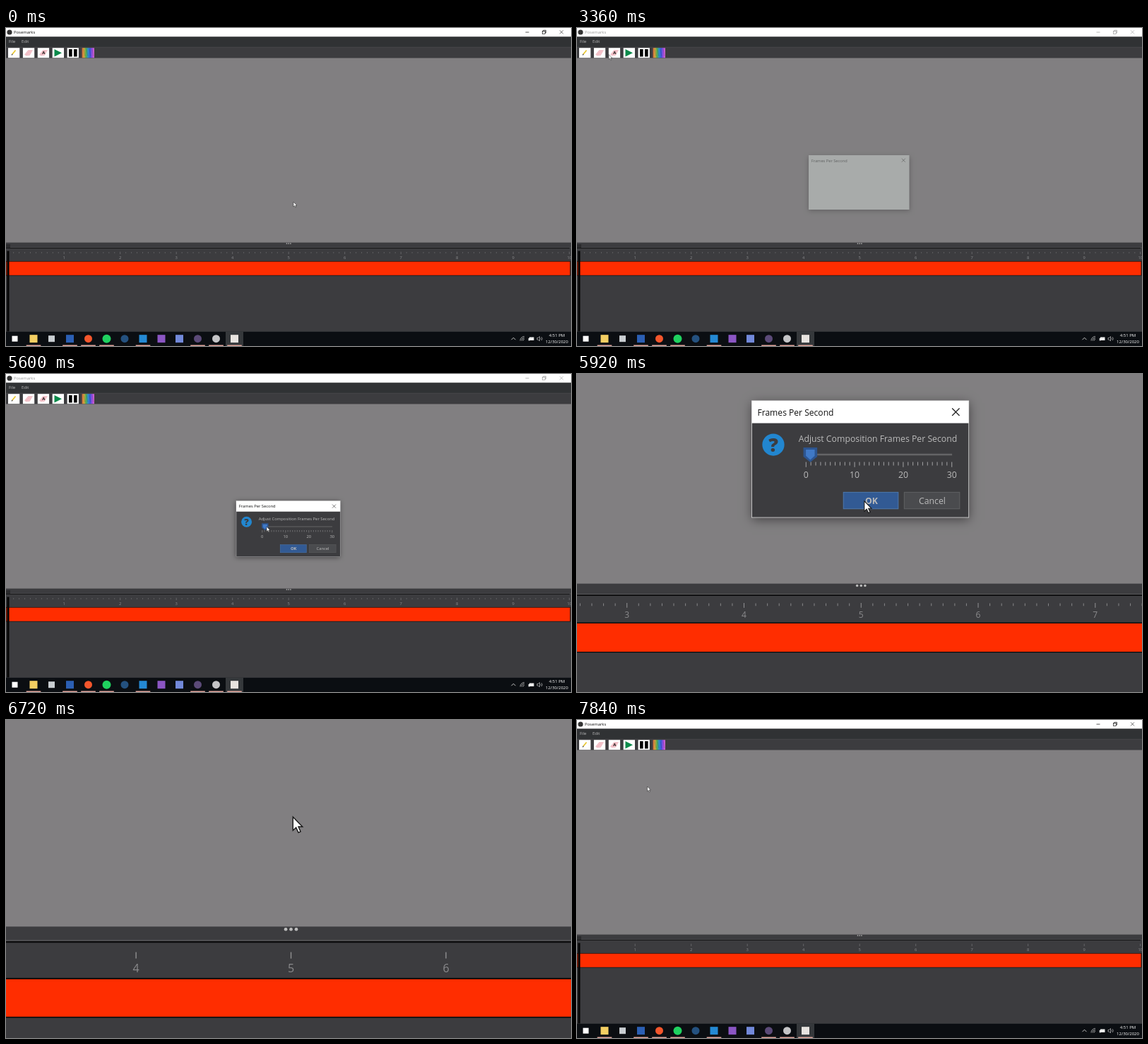
Animation of 800x450 px, one loop 8 s. Source, as an HTML page with a canvas:

```html
<!DOCTYPE html>
<html lang="en">
<head>
<meta charset="utf-8">
<title>Timeline editor</title>
<style>
html, body { margin: 0; width: 100%; height: 100%; overflow: hidden; background: #3c3c3f; }
canvas { display: block; }
</style>
</head>
<body>
<canvas width="800" height="450"></canvas>
<script>
const c = document.querySelector('canvas').getContext('2d');
const LOOP = 8000;
const FOCUS = [398.3, 310];
const SLATE = '#3c3c3f', INK = '#bbbbbb';

// Cursor stops: time, x, y
const STOPS = [
  [0, 407, 246], [400, 407, 246], [1500, 32, 20], [2250, 32, 20], [2700, 45, 37.5],
  [3400, 45, 37.5], [4100, 398, 216], [4500, 398, 216], [5450, 369, 216], [5620, 369, 216],
  [5900, 402.4, 247.6], [6400, 401.2, 247.4], [7300, 401.2, 247.4], [7680, 296, 184], [7840, 99.5, 94]
];

const ramp = (a, b, t) => {
  const u = Math.min(1, Math.max(0, (t - a) / (b - a)));
  return u * u * (3 - 2 * u);
};

function cursorAt(t) {
  const i = STOPS.findIndex(p => p[0] > t);
  if (i < 0) return STOPS.at(-1).slice(1);
  const [a, ax, ay] = STOPS[i - 1], [b, bx, by] = STOPS[i];
  const u = ramp(a, b, t);
  return [ax + (bx - ax) * u, ay + (by - ay) * u];
}

function box(x, y, w, h, fill, stroke, lw = 0.5) {
  c.fillStyle = fill;
  c.fillRect(x, y, w, h);
  if (stroke) {
    c.strokeStyle = stroke;
    c.lineWidth = lw;
    c.strokeRect(x, y, w, h);
  }
}

function poly(points, fill, stroke, lw = 0.6) {
  c.beginPath();
  points.forEach(([x, y]) => c.lineTo(x, y));
  c.closePath();
  if (fill) { c.fillStyle = fill; c.fill(); }
  if (stroke) { c.strokeStyle = stroke; c.lineWidth = lw; c.stroke(); }
}

function line(color, lw, ...p) {
  c.strokeStyle = color;
  c.lineWidth = lw;
  c.beginPath();
  for (let i = 0; i < p.length; i += 2) c.lineTo(p[i], p[i + 1]);
  c.stroke();
}

function disc(x, y, r, fill) {
  c.fillStyle = fill;
  c.beginPath();
  c.arc(x, y, r, 0, 7);
  c.fill();
}

function text(s, x, y, color = INK, align = 'left', size = 5.88, weight = 400) {
  c.font = `${weight} ${size}px "Open Sans", "Noto Sans", sans-serif`;
  c.fillStyle = color;
  c.textAlign = align;
  c.fillText(s, x, y);
}

function cross(x, y, r, color) {
  line(color, 0.6, x - r, y - r, x + r, y + r);
  line(color, 0.6, x - r, y + r, x + r, y - r);
}

// Canvas shadows ignore the transform, so they are scaled by hand.
function shadowed(draw, alpha = 0.5) {
  const zoom = c.getTransform().a;
  c.save();
  c.shadowColor = `rgba(0,0,0,${alpha})`;
  c.shadowBlur = 7 * zoom;
  c.shadowOffsetY = 1.5 * zoom;
  draw();
  c.restore();
}

function titleBar(active) {
  const ink = active ? '#111' : '#999';
  box(0, 0, 800, 12.4, '#fff');
  disc(5, 6, 3.6, '#333');
  text('Posemarks', 11, 8.2, ink);
  line(ink, 0.7, 735.5, 6, 740.5, 6);
  c.strokeStyle = ink;
  c.lineWidth = 0.7;
  c.strokeRect(759.5, 4.5, 3.7, 3.7);
  line(ink, 0.7, 760.8, 4.5, 760.8, 3.2, 764.5, 3.2, 764.5, 7, 763.2, 7);
  cross(786.5, 5.8, 2.5, ink);
}

function eraser(x) {
  poly([[x, 37.5], [x + 5, 31.5], [x + 11, 31.5], [x + 7, 38.5], [x + 2, 39]], '#f4c3ca', '#e3a3ad', 0.4);
  line('#e6a9b3', 0.5, x + 2, 38, x + 8, 32);
}

function toolbar() {
  box(0, 27, 800, 15.5, SLATE);
  line('#505052', 0.5, 0, 27.2, 800, 27.2);
  for (let i = 0; i < 5; i++) box(3 + i * 20.9, 28.2, 16.3, 14, '#fff');
  line('#e9c834', 1.8, 9, 37, 13.5, 31.5);
  line('#333', 1.1, 8, 38.3, 9.2, 36.9);
  eraser(26.5);
  eraser(47.5);
  text('A', 53.3, 37.3, '#111', 'center', 6, 700);
  poly([[68.5, 30], [79, 35.2], [68.5, 40.5]], '#0c8a4b');
  box(89, 30, 4.6, 10.5, '#000');
  box(96, 30, 4.6, 10.5, '#000');
  const g = c.createLinearGradient(107.5, 0, 125, 0);
  ['#c86440', '#d8a43c', '#4fae50', '#2f8fd0', '#3d55d8', '#a04ce0', '#d868c8']
    .forEach((k, i) => g.addColorStop(i / 6, k));
  box(107.5, 28.2, 17.5, 14, g);
  for (let i = 0; i < 4; i++) line('rgba(40,30,60,.3)', 0.6, 110 + i * 4, 30, 112 + i * 4, 40);
}

function timeline(fine) {
  box(0, 303.6, 800, 126, SLATE);
  for (let i = -1; i < 2; i++) disc(400.2 + i * 2.7, 305, 0.85, '#bbb');
  line('#6a6a6c', 0.3, 0, 310.7, 800, 310.7);
  line('#0c0c0d', 0.8, 0, 311.5, 798, 311.5);
  for (let i = 0; i <= 100; i++) {
    const x = 2.7 + i * 7.95, major = i % 10 === 0;
    if (major) {
      line('#909092', 0.5, x, 316.7, x, 320);
      if (i) text(i / 10, x, 326.9, '#8b8b8d', 'center', 5.8);
    } else if (fine) line('#858587', 0.5, x, 317, x, 318.8);
  }
  box(0, 329.9, 799.4, 20.5, '#0a0a0a');
  box(0.6, 330.6, 798, 19.2, '#ff2d00');
  box(0, 306, 6, 5, '#2b2b2d');
  box(1.4, 315.5, 3.1, 114, '#050505');
}

function taskbar() {
  box(0, 429.5, 800, 20.5, '#0b0e12');
  box(311, 429.5, 25, 20.5, '#35383b');
  const icons = [
    [12.5, '#fff', 8], [39, '#f4cf62', 11, 1], [64.5, '#c9ced2', 9], [90.5, '#2b5fb4', 11, 1],
    [116.5, '#f4562c', 11, 1, 1], [142.5, '#1fd15f', 12, 1, 1], [168, '#24517f', 11, 0, 1],
    [194, '#2489d4', 11, 1], [220, '#8b56c4', 11], [245.5, '#7289da', 11],
    [271.5, '#5b4a78', 11, 1, 1], [297.5, '#c4c4c6', 11, 1, 1], [323.5, '#e8e4e0', 11, 1]
  ];
  for (const [x, color, size, open, round] of icons) {
    if (round) disc(x, 439.7, size / 2, color);
    else box(x - size / 2, 439.7 - size / 2, size, size, color);
    if (open) box(x - 10.3, 448.6, 20.6, 1.4, '#e9aaa0');
  }
  line('#eee', 0.8, 715.5, 441.2, 718.5, 438.2, 721.5, 441.2);
  c.lineWidth = 0.7;
  c.strokeStyle = '#ddd';
  for (let r = 2; r < 7; r += 2) {
    c.beginPath();
    c.arc(734, 442.5, r, Math.PI, Math.PI * 1.5);
    c.stroke();
  }
  box(741, 437.5, 6.5, 4.5, '#eee');
  box(739.7, 438.8, 2, 3.6, '#eee');
  poly([[752, 438.5], [753.5, 438.5], [755.5, 436.5], [755.5, 443], [753.5, 441], [752, 441]], null, '#ddd');
  for (const r of [1.6, 3.4]) {
    c.beginPath();
    c.arc(755.8, 439.7, r, -0.8, 0.8);
    c.stroke();
  }
  text('4:51 PM', 780, 437.2, '#fff', 'center', 6);
  text('12/30/2020', 780, 446.4, '#fff', 'center', 6);
}

function menu(y) {
  box(18, 12.4, 19, 14.6, '#4b6eaf');
  text('Edit', 22, 21.3, '#ddd');
  shadowed(() => box(18, 27, 100, 38, '#303234'));
  box(18, 27, 100, 38, '#303234', '#515153');
  ['Edit Frames Per Second', 'Edit Composition Endpoint', 'Edit Background Color'].forEach((s, i) => {
    const hover = y > 29 + i * 11.5 && y < 40.5 + i * 11.5;
    if (hover) box(18.3, 29 + i * 11.5, 99.4, 11.5, '#4b6eaf');
    text(s, 33, 37 + i * 11.5, hover ? '#ddd' : INK);
  });
}

function opening() {
  shadowed(() => box(328, 180, 142.5, 77, '#a8abaa'), 0.25);
  text('Frames Per Second', 331.8, 189.8, '#606262', 'left', 5.7);
  cross(462.3, 187.2, 2.5, '#555');
}

function dialog(thumb) {
  shadowed(() => box(326, 179.5, 147.3, 79.2, SLATE));
  box(326, 179.5, 147.3, 79.2, SLATE, '#d8d8d8', 0.4);
  box(326, 179.5, 147.3, 15.2, '#fff');
  text('Frames Per Second', 329.8, 189.4, '#111', 'left', 5.8);
  cross(464.5, 187.1, 2.5, '#222');

  disc(340.6, 209.3, 7.5, '#2286cf');
  text('?', 340.6, 213.9, SLATE, 'center', 13, 800);
  text('Adjust Composition Frames Per Second', 357.7, 207.3);

  line('#646466', 1.2, 363, 216, 462, 216);
  for (let i = 0; i <= 30; i++) {
    const x = 362.8 + i * 3.3, major = i % 10 === 0;
    line('#a0a0a2', 0.5, x, 221, x, major ? 224.5 : 223.4);
    if (major) text(i, x, 231.7, INK, 'center');
  }
  const pin = (r, top, side, tip) =>
    [[thumb - r, top], [thumb + r, top], [thumb + r, side], [thumb, tip], [thumb - r, side]];
  poly(pin(4.7, 211.2, 217.4, 221.2), '#2d5590');
  poly(pin(3, 212.7, 216.8, 219.6), '#4079c6');

  box(388.2, 241.6, 37.2, 11.2, '#325a94', '#4c78ae');
  text('OK', 407.2, 249.4, INK, 'center', 5.9, 700);
  box(429.5, 241.6, 37.6, 11.2, '#4a4b4e', '#5f6062');
  text('Cancel', 448.5, 249.4, INK, 'center');
}

function pointer(x, y) {
  const shape = [[0, 0], [0, 6.9], [1.6, 5.4], [2.8, 8], [3.9, 7.5], [2.8, 5], [4.9, 5]];
  poly(shape.map(([dx, dy]) => [x + dx, y + dy]), '#fff', '#161616', 0.5);
}

function draw(t) {
  const zoom = 1 + 1.76 * (ramp(5600, 6155, t) - ramp(6720, 7360, t));
  const [x, y] = cursorAt(t);
  const modal = t >= 3280 && t < 6480;

  c.setTransform(zoom, 0, 0, zoom, FOCUS[0] * (1 - zoom), FOCUS[1] * (1 - zoom));
  box(0, 0, 800, 450, '#817f81');
  titleBar(!modal);
  box(0, 12.4, 800, 14.6, '#303234');
  text('File', 4, 21.3);
  text('Edit', 22, 21.3);
  toolbar();
  timeline(t < 6480);
  taskbar();

  if (t >= 1650 && t < 3280) menu(y);
  if (modal) {
    if (t < 3480) opening();
    else dialog(t < 4500 ? 395.8 : t < 5620 ? Math.max(366, x - 2.2) : 365.7);
  }
  pointer(x, y);
}

function tick() {
  draw(performance.now() % LOOP);
  requestAnimationFrame(tick);
}
tick();
</script>
</body>
</html>
```
